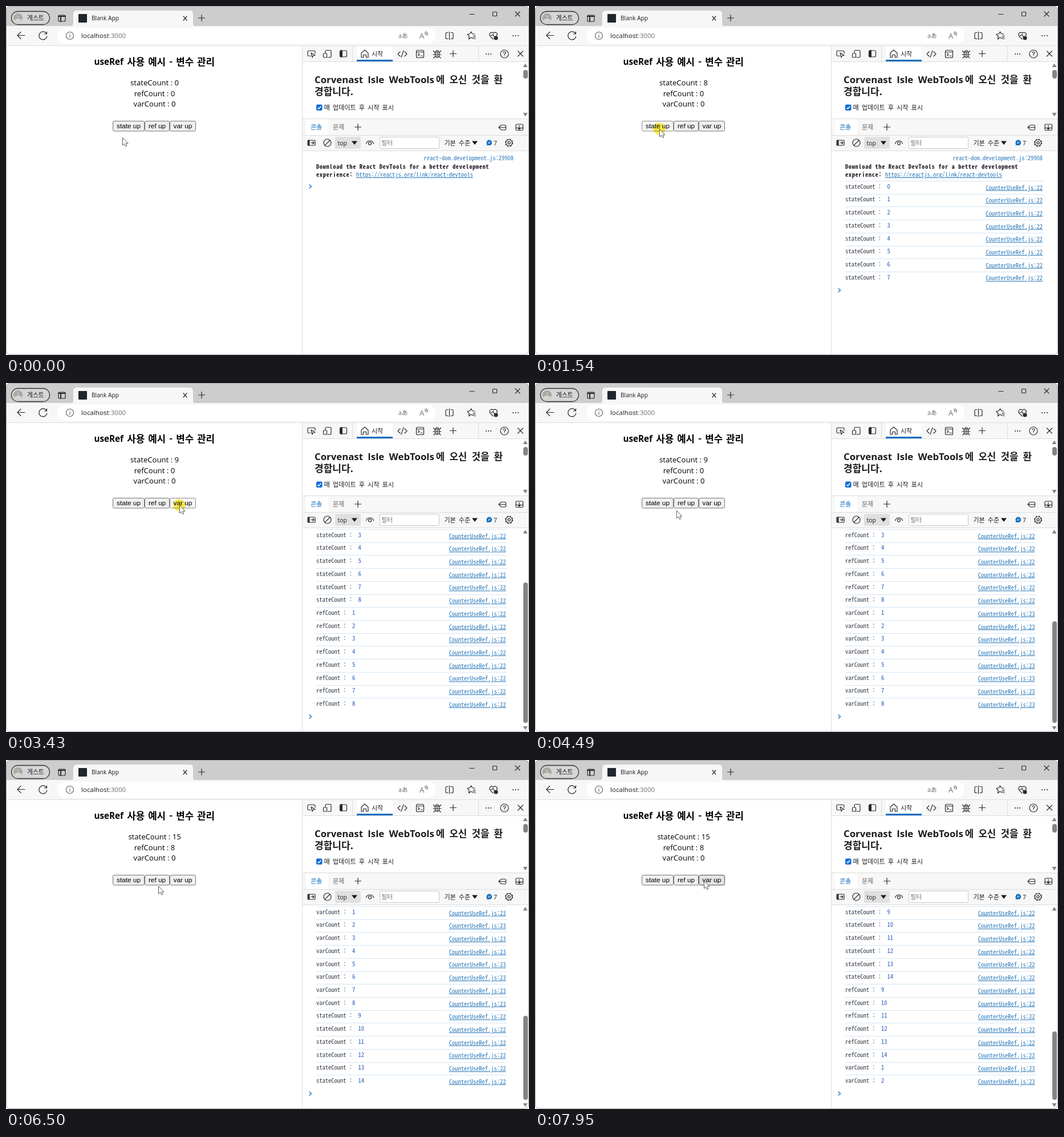
Animation, 917 px wide and 611 px high, one loop 8000 ms. Source, as an HTML page:

```html
<!DOCTYPE html>
<html lang="ko">
<head>
<meta charset="utf-8">
<title>Counter demo</title>
<style>
html, body { margin: 0; width: 100%; height: 100%; overflow: hidden; background: #fff; }
svg { display: block; }
text { font-family: "Open Sans", "Noto Sans CJK KR", "Noto Sans CJK JP", sans-serif; fill: #1b1b1b; }
.ko { font-family: "Noto Sans CJK KR", "Noto Sans CJK JP", sans-serif; }
.mid { text-anchor: middle; }
.end { text-anchor: end; }
.bold { font-weight: 700; }
.page text, text.page { fill: #000; }
.btn { font: 11.8px "Liberation Sans", Arial, sans-serif; fill: #000; text-anchor: middle; }
.mono text { font: 10.5px "Noto Sans Mono CJK KR", "Noto Sans Mono CJK JP", "Noto Sans Mono", monospace; fill: #303942; }
.mono .strong { font-weight: 700; letter-spacing: .58px; fill: #201a24; }
.mono .link { fill: #2a78b8; }
.mono .under { text-decoration: underline; }
.mono .num { fill: #2358b8; }
.icon { fill: none; stroke: #2b2b2b; stroke-width: 1.2; stroke-linecap: round; stroke-linejoin: round; }
.icon .fill { fill: #2b2b2b; }
.line { stroke: #dcdcdc; fill: none; }
.glow { fill: #fff04a; mix-blend-mode: multiply; }
</style>
</head>
<body>
<svg width="917" height="611" viewBox="0 0 917 611">
  <defs><clipPath id="pane"><rect x="520" y="254" width="397" height="356"/></clipPath></defs>

  <!-- window and toolbars -->
  <rect width="917" height="611" fill="#fff"/>
  <path d="M0 40V8Q0 0 8 0H909Q917 0 917 8V40Z" fill="#cdcdcd"/>
  <rect y="35" width="917" height="34" fill="#f7f7f7"/>
  <path d="M113 36Q118 36 118 30V14Q118 8 124 8H322Q328 8 328 14V30Q328 36 333 36Z" fill="#f7f7f7"/>
  <rect x="90" y="38" width="663" height="28" rx="14" fill="#fff"/>
  <rect x="520" y="69" width="397" height="28" fill="#f7f7f7"/>
  <rect x="615" y="70" width="63" height="27" fill="#fff"/>
  <rect x="615" y="94" width="63" height="3" fill="#0f6cbd"/>
  <rect x="520" y="197" width="397" height="56" fill="#f7f7f7"/>
  <rect x="526" y="198" width="39" height="28" fill="#fff"/>
  <rect x="577" y="229" width="45" height="21" rx="2" fill="#e0e0e0"/>
  <rect x="655.5" y="229.5" width="104" height="20" rx="2" fill="#fff" stroke="#cacaca"/>
  <path class="line" d="M0 69.5H917M519.5 70V610M520 97.5H917M607.5 70V97M828.5 70V97M520 197.5H917M520 226.5H917M520 253.5H917"/>

  <!-- tab strip and address bar -->
  <rect x="9.5" y="9.5" width="67" height="23" rx="11.5" fill="#d6d6d6" stroke="#333" stroke-width="1.3"/>
  <circle cx="21" cy="21" r="8" fill="#aaa7a3"/>
  <path d="M14 25Q21 19 28 25Q21 33 14 25" fill="#d8d6d3"/>
  <text class="mid" x="21" y="22" font-size="8" style="fill:#fff">?</text>
  <text class="ko" x="37" y="24.5" font-size="10.8">게스트</text>
  <rect x="127" y="14" width="15" height="15" rx="1" fill="#20262f"/>
  <text x="150" y="25" font-size="10.2">Blank App</text>
  <text x="132" y="56.2" font-size="11.6">localhost<tspan fill="#707070">:3000</tspan></text>
  <text class="ko" x="688" y="55.5" font-size="10.5" style="fill:#6b6b6b">aあ</text>
  <text x="725" y="57" font-size="13" style="fill:#6b6b6b">A</text>

  <g class="icon">
    <rect x="92" y="16" width="12" height="11" rx="2"/><path d="M92 18H104M96 18V27" stroke-width="2"/>
    <path d="M311 18L317 25M317 18L311 25M337.500 21H348.500M343 15.500V26.500"/>
    <path d="M813 14.500H821M893 10L901 18M901 10L893 18"/><rect x="853.500" y="10.500" width="7" height="7" rx="1"/>
    <path d="M33 51.500H20L26 45.500M20 51.500L26 57.500M71 48.500A7 7 0 1 0 71.800 53M71.500 45V49H67.500"/>
    <g stroke="#666"><circle cx="112" cy="52" r="6.500"/><path d="M112 51V55M112 48.800V49M734 47Q737 48 736.500 51M736 45Q740 47 739 51"/></g>
    <path d="M775 46.500H773Q771 46.500 771 48.500V55.500Q771 57.500 773 57.500H775M780 46.500H782Q784 46.500 784 48.500V55.500Q784 57.500 782 57.500H780M777.500 45V59"/>
    <path d="M819 57L815 55L811.500 58L812 53L809 49.500L813.500 48.500L815.500 45L817.500 48.500L822 49.500M819 52.500H823M819 55H823M821 57.500H823"/>
    <path d="M854 58L849 53C846 49 850 44 854.500 47.500C859 44 863 49 860.500 52M850 51.500H852.500L854 49.500L856 53.500H858"/>
    <circle class="fill" cx="859" cy="56" r="3"/>
    <path d="M889 52H889.100M893.500 52H893.600M898 52H898.100" stroke-width="2"/>

    <path d="M534 87.500H530.500Q529 87.500 529 86V80Q529 78.500 530.500 78.500H540.500Q542 78.500 542 80V83M535 82L542 86.500L538.500 87L537 90Z"/>
    <path d="M560 82V79.500Q560 77.500 562 77.500H568Q570 77.500 570 79.500V88Q570 90 568 90H564"/><rect x="556.500" y="83" width="6" height="7" rx="1"/>
    <rect x="585.500" y="78" width="12" height="11" rx="2"/><path d="M588 79V88" stroke-width="4"/>
    <path d="M623 82.500L629 77L635 82.500V90H631.500V85.500H626.500V90H623Z"/>
    <path d="M691 80L687 84L691 88M699 80L703 84L699 88M697 78L693 90"/>
    <rect x="719.500" y="77.500" width="13" height="13" rx="2"/><path d="M719.500 80.500H732.500M722.500 83L725 85L722.500 87M727 87.500H730"/>
    <rect x="752.500" y="80" width="7" height="10" rx="3.500"/><path d="M753 80Q756 75 759 80M749.500 78.500L752.500 82M762.500 78.500L759.500 82M749 85H763M750 91L753 88M762 91L759 88M756 80V90"/>
    <path d="M778.500 83.500H789.500M784 78V89"/>
    <path d="M842 84H842.100M846 84H846.100M850 84H850.100" stroke-width="2"/>
    <circle cx="874" cy="84" r="7"/><path d="M872 82Q872 80 874 80Q876 80 876 82Q876 83 874 84.500V85.500M874 87.500V87.600"/>
    <path d="M897.500 79L906.500 88M906.500 79L897.500 88"/>
    <path d="M611.500 212H622.500M617 206.500V217.500"/>
    <path d="M867 209.500Q868 208.500 869 208.500H875Q876.500 208.500 876.500 210V215.500Q876.500 217 875 217H869Q867.500 217 867.500 215.500M871 212.500H864M866.500 210L864 212.500L866.500 215M872 212.500H876"/>
    <rect x="894" y="207" width="12.500" height="10.500" rx="1.500"/><path d="M894 213.500H906.500M900 209V216M898 214L900 216L902 214"/>
    <rect x="529" y="235" width="13" height="9" rx="1"/><path d="M531 236V243" stroke-width="3"/><path d="M535 239.500H540M538 237.500L540 239.500L538 241.500"/>
    <circle cx="563.500" cy="239.500" r="6.500"/><path d="M568 235L559 244"/>
    <path d="M631.500 241Q633 236 638 236Q643 236 644.500 241"/><circle cx="638" cy="240.500" r="2.500"/>
    <circle cx="882" cy="239.500" r="5.500"/><circle cx="882" cy="239.500" r="2.200"/>
    <circle cx="882" cy="239.500" r="6.500" stroke-linecap="butt" stroke-dasharray="2.600 2.500"/>
  </g>
  <path d="M606 236.500H616L611 243ZM817 236.500H827L822 243Z" fill="#1b1b1b"/>
  <path d="M847.500 234.500A4.800 4.800 0 1 1 845 243.500L842.500 244.500L843.300 242A4.800 4.800 0 0 1 847.500 234.500" fill="#0f6cbd"/>
  <path d="M845 238.500H850M845 240.500H848.500" stroke="#fff" stroke-width=".8"/>

  <!-- devtools labels -->
  <text class="ko" x="641" y="88" font-size="11">시작</text>
  <text class="bold" x="541" y="135" font-size="16.8" word-spacing="4">Corvenast Isle WebTools</text>
  <text class="ko bold end" x="871" y="135" font-size="16.8" word-spacing="3.5">에 오신 것을 환</text>
  <text class="ko bold" x="541" y="156" font-size="17">경합니다.</text>
  <rect x="544" y="172.500" width="10.500" height="10.500" rx="2" fill="#0f6cdb"/>
  <path d="M546.500 178L548.600 180.200L552.200 175.500" fill="none" stroke="#fff" stroke-width="1.5"/>
  <text class="ko" x="557.500" y="181.500" font-size="11.2" word-spacing="1.800">매 업데이트 후 시작 표시</text>
  <path d="M906.500 107H914.500L910.500 100.500ZM906.500 187H914.500L910.500 193.500Z" fill="#858585"/>
  <rect x="907" y="112" width="8" height="15" rx="4" fill="#858585"/>
  <text class="ko" x="534" y="216" font-size="11" style="fill:#0f6cbd">콘솔</text>
  <text class="ko" x="573" y="216" font-size="11" style="fill:#666">문제</text>
  <text x="581.500" y="244" font-size="10.500">top</text>
  <text class="ko" x="658" y="243.500" font-size="11" style="fill:#757575">필터</text>
  <text class="ko" x="768.500" y="243.500" font-size="11" word-spacing="2">기본 수준</text>
  <text x="855" y="243.500" font-size="10.500">7</text>

  <!-- page -->
  <text class="bold page" x="154.500" y="103" font-size="15.200">useRef</text>
  <text class="ko bold end page" x="366" y="103.500" font-size="16.800" word-spacing="1.300">사용 예시 - 변수 관리</text>
  <g id="counts" class="mid page" font-size="13.100"></g>
  <g id="buttons"></g>
  <g class="mono" clip-path="url(#pane)" id="log"></g>
  <rect x=".5" y=".5" width="916" height="610" rx="7" fill="none" stroke="#a6a6a6"/>
  <circle id="glow" class="glow" r="10.500"/>
  <path id="cursor" d="M.5 .5V14L3.600 11.200L5.600 15.600L7.900 14.600L6 10.300H10Z" fill="#fff" stroke="#5a5a62"/>
</svg>
<script>
const $ = id => document.getElementById(id);
const LOOP = 8000, ROW = 22.71, FIRST = 316, LAST = 584;

// [name, held ms, press times]
const clicks = [
  ['state', 65, [540]],
  ['state', 55, [810, 913, 1016, 1119, 1222, 1325, 1428]],
  ['state', 130, [1540]],
  ['ref', 55, [2130, 2270, 2414, 2540, 2660, 2780, 2900, 3020]],
  ['var', 60, [3430, 3530, 3630, 3730, 3830, 3930, 4030, 4130]],
  ['state', 80, [4720, 4900, 5080, 5260, 5440, 5620]],
  ['ref', 55, [6590, 6710, 6845, 6960, 7160, 7280]],
  ['var', 60, [7700, 7860]]
].flatMap(([name, held, times]) => times.map(down => ({ name, down, up: down + held })));

// [ms, x, y] of the pointer tip
const path = [
  [0, 204, 230], [70, 204, 230], [130, 207, 223], [340, 207, 223], [540, 218, 215],
  [1700, 218, 215], [2000, 264, 215], [3080, 264, 215], [3210, 304, 214], [4230, 304, 214],
  [4490, 248, 223], [4640, 216, 215], [5970, 216, 215], [6500, 267, 220.5], [6570, 265, 215],
  [7350, 265, 215], [7550, 296, 211], [LOOP, 296, 211]
];
const buttons = [['state', 187, 56], ['ref', 243, 44], ['var', 287, 46]];

function pointer(t) {
  const i = path.findIndex(p => p[0] > t);
  const [t0, x0, y0] = path[i - 1], [t1, x1, y1] = path[i];
  const k = (t - t0) / (t1 - t0);
  return [x0 + (x1 - x0) * k, y0 + (y1 - y0) * k];
}

// Replays the clicks done so far; a state update re-renders and resets the plain variable.
function replay(t) {
  const now = { state: 0, ref: 0, var: 0 };
  let shown = { ...now };
  const rows = [];
  for (const { name, up } of clicks) {
    if (up > t) break;
    const value = name === 'state' ? now.state++ : ++now[name];
    rows.push([name + 'Count', value, name === 'var' ? 23 : 22]);
    if (name === 'state') {
      now.var = 0;
      shown = { ...now };
    }
  }
  return { shown, rows };
}

const text = (x, y, cls, str) => `<text x="${x}" y="${y}" class="${cls}">${str}</text>`;

function drawLog(rows) {
  const scroll = Math.max(0, FIRST + ROW * rows.length - LAST);
  const right = scroll ? 876.5 : 890;
  let out = text(right, 270 - scroll, 'link end', 'react-dom.development.js:29908')
    + text(544, 285 - scroll, 'strong', 'Download the React DevTools for a better development')
    + text(544, 299 - scroll, 'strong', 'experience:')
    + text(614, 299 - scroll, 'link under', 'https://reactjs.org/link/react-devtools');
  rows.forEach(([label, value, line], i) => {
    const y = FIRST + ROW * i - scroll;
    if (y < 240) return;
    out += `<path d="M544 ${Math.round(y - 10) + .5}H${right + 2}" stroke="#d6e6f5"/>`
      + text(544, y + 3.7, '', label + ' :')
      + text(544 + (label.length + 4) * 5.25, y + 3.7, 'num', value)
      + text(right, y + 5.5, 'link under end', 'CounterUseRef.js:' + line);
  });
  const y = FIRST + ROW * rows.length - scroll;
  out += `<path d="M531.5 ${y - 3.5}l4 3.5l-4 3.5" fill="none" stroke="#1a6fd0" stroke-width="1.3"/>`;
  if (scroll) {
    const size = 327 * 357 / (357 + scroll);
    out += `<path d="M906.500 263.500h8l-4 -6.500zM906.500 601h8l-4 6.500z" fill="#858585"/>
      <rect x="907" y="${595 - size}" width="8" height="${size}" rx="4" fill="#858585"/>`;
  }
  $('log').innerHTML = out;
}

function drawButtons(hover, pressed) {
  $('buttons').innerHTML = buttons.map(([name, x, w]) => {
    const on = name === hover;
    const [fill, edge] = on && pressed ? ['#f5f5f5', '#8d8d8d'] : on ? ['#e3e3e3', '#4f4f4f'] : ['#efefef', '#767676'];
    return `<rect x="${x + .5}" y="201.500" width="${w - 1}" height="17.500" rx="2.500" fill="${fill}" stroke="${edge}"/>`
      + text(x + w / 2, 214, 'btn', name + ' up');
  }).join('');
}

let drawn = -1;
function frame(ms) {
  const t = ms % LOOP;
  const { shown, rows } = replay(t);
  if (rows.length !== drawn) {
    drawn = rows.length;
    drawLog(rows);
    $('counts').innerHTML = ['state', 'ref', 'var']
      .map((name, i) => text(260.5, 139 + 18.7 * i, 'mid', `${name}Count : ${shown[name]}`)).join('');
  }
  const [x, y] = pointer(t);
  const pressed = clicks.some(c => t >= c.down && t < c.up);
  const over = buttons.find(([, left, w]) => y < 220 && x >= left && x < left + w);
  drawButtons(over && over[0], pressed);
  for (const id of ['glow', 'cursor']) $(id).setAttribute('transform', `translate(${x} ${y})`);
  $('glow').style.display = pressed ? '' : 'none';
}

function tick() {
  frame(performance.now());
  requestAnimationFrame(tick);
}
tick();
</script>
</body>
</html>
```
